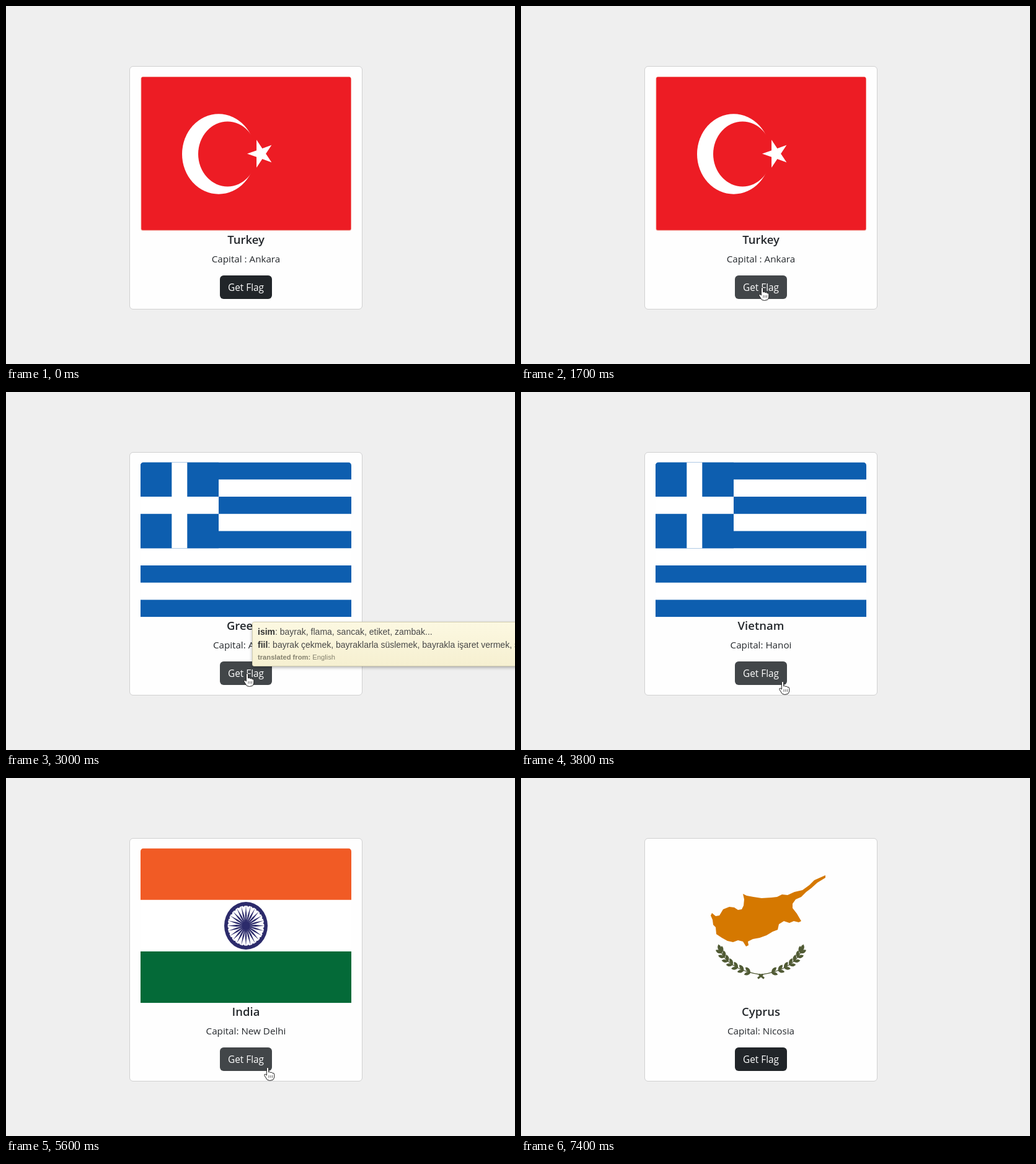
An HTML page with a canvas for the animation above (7.7 s loop, 821 by 578 pixels).

```html
<!DOCTYPE html>
<html lang="en">
<head>
<meta charset="utf-8">
<title>Get Flag</title>
<style>
  html, body { margin: 0; width: 100%; height: 100%; overflow: hidden; background: #efefef; }
  #stage { position: relative; width: 821px; height: 578px; overflow: hidden; background: #efefef; }
  #stage > * { position: absolute; white-space: pre; }
  canvas, svg { left: 0; top: 0; }
  #card { left: 199px; top: 97px; width: 374px; height: 391px; border: 1px solid #d0d0d1; border-radius: 6px; background: #fefefe; }
  .label { left: 200px; width: 374px; text-align: center; color: #24282c; font-family: "Open Sans", sans-serif; }
  #title { top: 362px; font-size: 18.5px; font-weight: 600; line-height: 30px; }
  #capital { top: 393px; font-size: 15.2px; line-height: 30px; }
  #button { left: 345px; top: 435px; width: 84px; height: 38px; border-radius: 6px; text-align: center; color: #fff; font: 15.4px/39px "Open Sans", sans-serif; }
  #tip { left: 397px; top: 371px; width: 460px; height: 70px; border: 1px solid #d3cfb0; border-radius: 3px; background: linear-gradient(#fcf8e1, #f6f0d1); box-shadow: 0 2px 5px rgba(0,0,0,.3); color: #484848; font: 14px/21px "Liberation Sans", Arial, sans-serif; }
  #tip div { position: absolute; left: 8px; }
  #tip b { color: #333; }
  #tip .from, #tip .from b { font-size: 11.2px; color: #85826f; }
</style>
</head>
<body>
<div id="stage">
  <div id="card"></div>
  <canvas id="flag" width="821" height="578"></canvas>
  <div id="title" class="label"></div>
  <div id="capital" class="label"></div>
  <div id="button">Get Flag</div>
  <div id="tip">
    <div style="top:5px"><b>isim</b>: bayrak, flama, sancak, etiket, zambak...</div>
    <div style="top:26px"><b>fiil</b>: bayrak çekmek, bayraklarla süslemek, bayrakla işaret vermek, söndürmek</div>
    <div class="from" style="top:46px"><b>translated from:</b> English</div>
  </div>
  <svg width="821" height="578">
    <g id="cursor" fill="#fff" stroke="#222" stroke-width="1" stroke-linejoin="round">
      <g id="hand">
        <path d="M-1.6 1.5Q0-1 1.6 1.5V8Q3.6 6.6 5 8.6Q6.8 7.5 8 9.6Q10.6 8.9 10.8 11.5V15Q10.6 18 8.6 20.4Q3 22.6-.6 20.4L-5 13.6Q-5.7 11-3.6 11.2L-1.6 13Z"/>
        <path d="M2 13V17M4.8 13V17M7.5 13V17" stroke-width=".7"/>
      </g>
      <path id="arrow" d="M0 0V16L3.8 12.4L6.4 18.2L8.8 17.1L6.2 11.5H11.5Z"/>
    </g>
  </svg>
</div>
<script>
const LOOP = 7700, STEP = 100;
const $ = id => document.getElementById(id);
const ctx = $('flag').getContext('2d');
const L = 217, T = 113.5, W = 340, H = 249.75, CX = 387, CY = 238.5;

function rect(color, x, y, w, h) {
  ctx.fillStyle = color;
  ctx.fillRect(x, y, w, h);
}

function ellipse(color, x, y, rx, ry) {
  ctx.fillStyle = color;
  ctx.beginPath();
  ctx.ellipse(x, y, rx, ry, 0, 0, Math.PI * 2);
  ctx.fill();
}

// Five-pointed star; turn is the direction of its first point.
function star(color, x, y, rx, ry, turn) {
  ctx.fillStyle = color;
  ctx.beginPath();
  for (let i = 0; i < 10; i++) {
    const a = turn + i * Math.PI / 5, k = i % 2 ? 0.382 : 1;
    ctx.lineTo(x + Math.cos(a) * rx * k, y + Math.sin(a) * ry * k);
  }
  ctx.fill();
}

const UP = -Math.PI / 2, DOWN = Math.PI / 2, LEFT = Math.PI, RIGHT = 0;

function turkey() {
  const red = '#ed1c24';
  ctx.fillStyle = '#f3a69c';
  ctx.beginPath();
  ctx.roundRect(217.5, 114, 339.5, 248.7, 3);
  ctx.fill();
  ctx.fillStyle = red;
  ctx.beginPath();
  ctx.roundRect(218.3, 114.8, 338, 247, 2.5);
  ctx.fill();
  ellipse('#fff', 343, 239, 59, 64.7);
  ellipse(red, 357.3, 239, 47.3, 52.5);
  star('#fff', 410.8, CY, 21.8, 23.7, LEFT);
}

function greece() {
  const blue = '#0d5eaf', s = H / 9;
  rect('#fff', L, T, W, H);
  for (let i = 0; i < 9; i += 2) rect(blue, L, T + i * s, W, s);
  rect(blue, L, T, 126, s * 5);
  rect('#fff', 267.3, T, 25, s * 5);
  rect('#fff', L, T + 2 * s, 126, s);
}

function vietnam() {
  rect('#da251d', L, T, W, H);
  star('#ff0', CX, CY, 67.3, 74.6, UP);
}

function india() {
  const navy = '#2c2b6b';
  rect('#fff', L, T, W, H);
  rect('#f15b25', L, T, W, H / 3);
  rect('#046a38', L, T + H * 2 / 3, W, H / 3);
  ctx.save();
  ctx.translate(CX, CY);
  ctx.scale(35, 38.5);
  ellipse(navy, 0, 0, 1, 1);
  ellipse('#fff', 0, 0, 0.84, 0.84);
  for (let i = 0; i < 24; i++) {
    ctx.save();
    ctx.rotate(i * Math.PI / 12);
    ctx.fillStyle = navy;
    ctx.beginPath();
    ctx.moveTo(0, -0.02);
    ctx.lineTo(0.45, -0.036);
    ctx.lineTo(0.84, 0);
    ctx.lineTo(0.45, 0.036);
    ctx.lineTo(0, 0.02);
    ctx.fill();
    ctx.rotate(Math.PI / 24);
    ellipse(navy, 0.84, 0, 0.035, 0.035);
    ctx.restore();
  }
  ellipse(navy, 0, 0, 0.18, 0.18);
  ctx.restore();
}

function micronesia() {
  rect('#75b0da', L, T, W, H);
  star('#fff', CX, 164, 17.4, 25, UP);
  star('#fff', CX, 312.7, 17.4, 24.5, DOWN);
  star('#fff', 334, CY, 18.3, 24.5, LEFT);
  star('#fff', 440, CY, 18.3, 24.5, RIGHT);
}

const ISLAND = [
  491,157, 491,161, 478,169, 468,178, 460,184, 452,192, 443,196, 438,203, 438,210,
  445,219, 452,231, 448,233, 440,231, 433,234, 424,231, 416,236, 414,245, 406,248,
  396,254, 385,258, 374,260, 366,264, 367,270, 363,272, 358,264, 350,262, 342,265,
  333,263, 324,258, 315,252, 314,241, 310,237, 309,229, 306,222, 308,218, 314,223,
  320,222, 326,212, 336,208, 344,209, 350,213, 356,212, 359,206, 360,196, 358,187,
  364,190, 375,192, 388,194, 404,193, 413,192, 421,188, 430,189, 441,184, 454,181,
  465,173, 473,165, 482,161
];

function leaf(x, y, angle, size) {
  ctx.save();
  ctx.translate(x, y);
  ctx.rotate(angle);
  ctx.beginPath();
  ctx.moveTo(0, 0);
  ctx.quadraticCurveTo(size * 0.55, -size * 0.45, size, 0);
  ctx.quadraticCurveTo(size * 0.55, size * 0.45, 0, 0);
  ctx.fill();
  ctx.restore();
}

function branch(side) {
  ctx.save();
  ctx.translate(CX, 0);
  ctx.scale(side, 1);
  ctx.fillStyle = ctx.strokeStyle = '#515b35';
  ctx.lineWidth = 1.3;
  ctx.beginPath();
  ctx.moveTo(-5, 323.5);
  ctx.lineTo(3, 317);
  ctx.lineWidth = 3;
  ctx.stroke();
  ctx.lineWidth = 1.3;
  ctx.beginPath();
  ctx.moveTo(3, 318);
  ctx.quadraticCurveTo(-50, 311, -65, 280);
  ctx.stroke();
  for (let i = 0; i < 7; i++) {
    const t = 0.2 + i * 0.125, u = 1 - t;
    const x = 3 * u * u - 100 * u * t - 65 * t * t;
    const y = 318 * u * u + 622 * u * t + 280 * t * t;
    const a = Math.atan2(-14 * u - 62 * t, -106 * u - 30 * t);
    leaf(x, y, a - 0.55, 11);
    leaf(x, y, a + 0.55, 12);
  }
  leaf(-65, 281, -1.85, 13);
  ctx.restore();
}

function cyprus() {
  rect('#fefefe', L, T, W, H);
  ctx.fillStyle = '#d57800';
  ctx.beginPath();
  for (let i = 0; i < ISLAND.length; i += 2) ctx.lineTo(ISLAND[i], ISLAND[i + 1]);
  ctx.fill();
  branch(1);
  branch(-1);
}

// Each country: when its text appears, when its image has loaded.
const SHOWS = [
  { text: 0, image: 0, name: 'Turkey', capital: 'Capital : Ankara', draw: turkey },
  { text: 2600, image: 2700, name: 'Greece', capital: 'Capital: Athens', draw: greece },
  { text: 3800, image: 3900, name: 'Vietnam', capital: 'Capital: Hanoi', draw: vietnam },
  { text: 4600, image: 4800, name: 'Cyprus', capital: 'Capital: Nicosia', draw: cyprus },
  { text: 5400, image: 5500, name: 'India', capital: 'Capital: New Delhi', draw: india },
  { text: 6100, image: 6200, name: 'Micronesia', capital: 'Capital: Palikir', draw: micronesia },
  { text: 6900, image: 6900, name: 'Cyprus', capital: 'Capital: Nicosia', draw: cyprus }
];

const latest = (key, t) => SHOWS.filter(s => s[key] <= t).pop();
const clamp = v => Math.max(0, Math.min(1, v));
const mix = (a, b, p) => a.map((v, i) => v + (b[i] - v) * p);

const ENTRY = [402, 582], CLICK = [389, 454], REST = [422, 467], EXIT = [438, 590];

function pointer(t) {
  if (t < 900 || t >= 7400) return null;
  if (t < 3200) return mix(ENTRY, CLICK, 1 - (1 - clamp((t - 800) / 800)) ** 2);
  if (t < 7100) return mix(CLICK, REST, clamp((t - 3100) / 300));
  return mix(REST, EXIT, clamp((t - 7000) / 400));
}

function drawFlag(show) {
  ctx.clearRect(0, 0, 821, 578);
  ctx.save();
  ctx.beginPath();
  ctx.roundRect(L, T, W, H, [5, 5, 0, 0]);
  ctx.clip();
  show.draw();
  ctx.restore();
}

let shown = null;

function render(t) {
  const label = latest('text', t), image = latest('image', t);
  $('title').textContent = label.name;
  $('capital').textContent = label.capital;
  if (image !== shown) drawFlag(shown = image);

  const p = pointer(t);
  const hover = p && p[0] >= 345 && p[0] < 429 && p[1] >= 435 && p[1] < 473;
  $('button').style.background = hover ? '#424649' : '#212529';
  $('cursor').style.display = p ? '' : 'none';
  if (p) $('cursor').setAttribute('transform', `translate(${p[0]} ${p[1]})`);
  $('hand').style.display = hover ? '' : 'none';
  $('arrow').style.display = hover ? 'none' : '';

  $('tip').style.opacity = clamp((t - 2700) / 200) * clamp((3300 - t) / 200);
}

let last = -1;
function tick() {
  const t = Math.floor(performance.now() % LOOP / STEP) * STEP;
  if (t !== last) render(last = t);
  requestAnimationFrame(tick);
}
tick();
</script>
</body>
</html>
```
